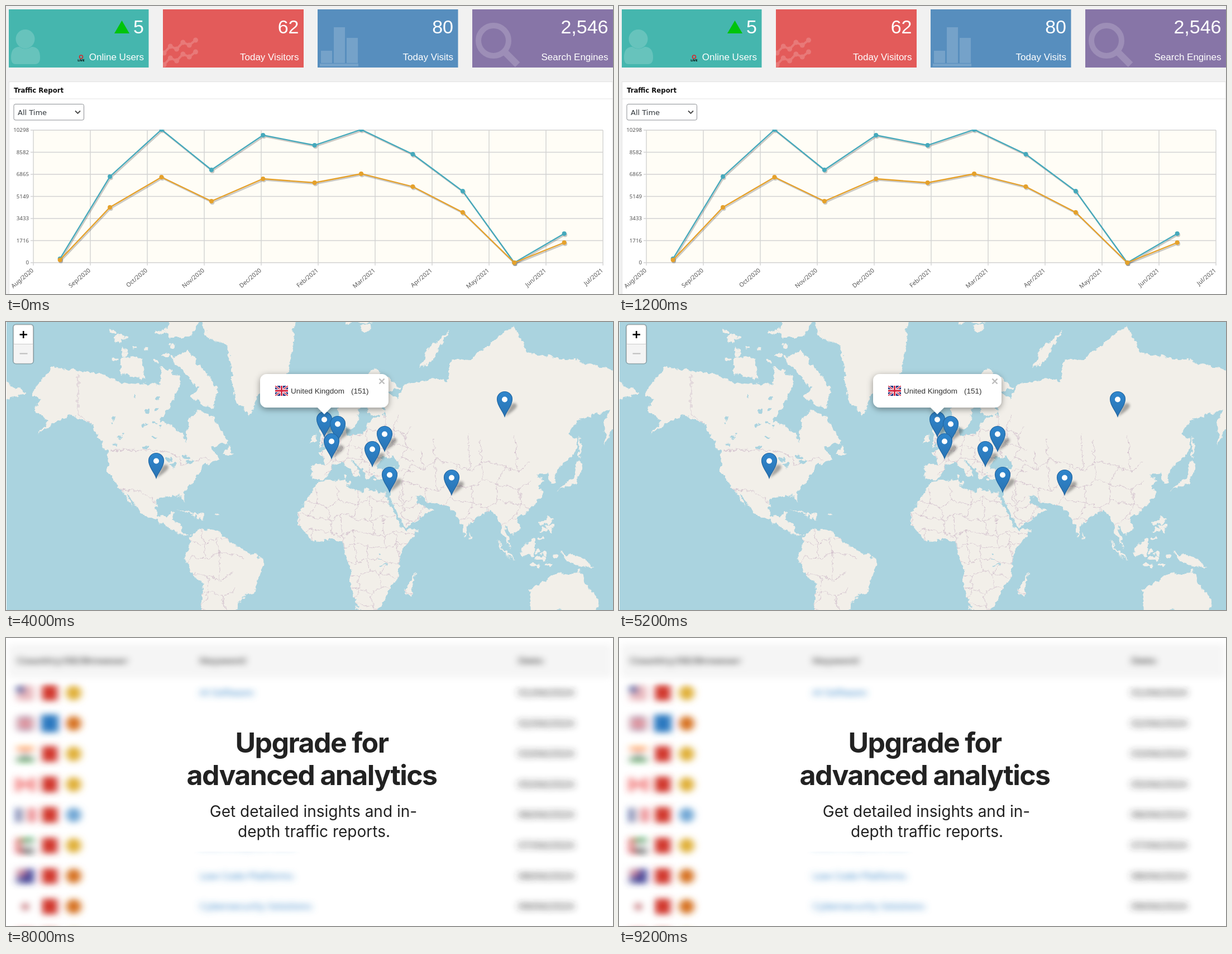
Animation, 1087 px wide and 515 px high, one loop 10 s. Source, as an HTML page:

```html
<!DOCTYPE html>
<html lang="en">
<head>
<meta charset="utf-8">
<title>Site statistics</title>
<style>
  html, body { margin: 0; width: 100%; height: 100%; overflow: hidden; background: #fff; }
  svg { display: block; width: 1087px; height: 515px; font-family: "DejaVu Sans", sans-serif; }
  .arial { font-family: "Liberation Sans", sans-serif; }
  .noto { font-family: "Noto Sans", sans-serif; }
  .inter { font-family: Inter, sans-serif; }
</style>
</head>
<body>
<svg id="stage" viewBox="0 0 1087 515"></svg>
<script>
const SCENE_MS = 2000;
const DAY_MS = 864e5;

const text = (x, y, size, str, attrs = '') => `<text x="${x}" y="${y}" font-size="${size}" ${attrs}>${str}</text>`;
const rect = (x, y, w, h, fill, attrs = '') => `<rect x="${x}" y="${y}" width="${w}" height="${h}" fill="${fill}" ${attrs}/>`;
const circle = (x, y, r, fill, attrs = '') => `<circle cx="${x}" cy="${y}" r="${r}" fill="${fill}" ${attrs}/>`;
const path = (d, attrs = '') => `<path d="${d}" ${attrs}/>`;
const stroke = (color, width) => `fill="none" stroke="${color}" stroke-width="${width}"`;
const hline = (x1, x2, y, color) => path(`M${x1} ${y}H${x2}`, stroke(color, 1));
const range = n => [...Array(n).keys()];
const END = 'text-anchor="end"', MIDDLE = 'text-anchor="middle"', BOLD = 'font-weight="bold"';

// ---- Flags, on a 24 x 16 field ----
const WHITE = '#fff', RED = '#d8142c', MAPLE = '#f01818';
const rows = (...colors) => colors.map((c, i) => rect(0, i * 16 / colors.length, 24, 16 / colors.length, c)).join('');
const cols = (...colors) => colors.map((c, i) => rect(i * 24 / colors.length, 0, 24 / colors.length, 16, c)).join('');
const unionJack = rect(0, 0, 24, 16, '#1f2f7c') +
  path('M0 0L24 16M24 0L0 16', stroke(WHITE, 3.4)) + path('M0 0L24 16M24 0L0 16', stroke('#d4213d', 1.3)) +
  path('M12 0V16M0 8H24', stroke(WHITE, 5)) + path('M12 0V16M0 8H24', stroke('#d4213d', 2.8));
const flags = {
  th: rows('#e3122b', WHITE, '#28327f', '#28327f', WHITE, '#e3122b'),
  np: path('M1 .5L22 8H9L20 15.5H1Z', 'fill="#d5173f" stroke="#233a8c"') + circle(6, 11.5, 2, WHITE) + circle(6, 5, 1.4, WHITE),
  unknown: rect(0, 0, 24, 16, '#f5f5f5') + path('M9 7.5L12 5L15 7.5V11H9Z', 'fill="#d0d0d0"'),
  proxy: rows('#b8b8b8', '#c6c6c6', '#a8a8a8') + text(12, 15, 17, '?', `${MIDDLE} ${BOLD} font-family="Liberation Serif, serif" fill="#000"`),
  us: rows(...range(13).map(i => i % 2 ? WHITE : '#cf3347')) + rect(0, 0, 11, 8.6, '#3b4a91') +
    path('M1 2H11M1 4.4H11M1 6.8H11', stroke('#c9cfe6', .7) + ' stroke-dasharray="1 1"'),
  in: rows('#ff9933', WHITE, '#138a1b') + circle(12, 8, 1.9, '#c5c8ea', 'stroke="#33419b" stroke-width=".7"'),
  id: rows(RED, WHITE),
  at: rows('#e0231c', WHITE, '#e0231c'),
  gb: unionJack,
  ca: cols(MAPLE, WHITE, WHITE, MAPLE) + path('M12 3L14 5V7.500L16.500 7L12 12L7.500 7L10 7.500V5ZM12 8V13', `fill="${MAPLE}" stroke="${MAPLE}" stroke-width=".6"`),
  fr: cols('#1e3c93', WHITE, '#e32a3c'),
  ae: rows('#00963a', WHITE, '#000') + rect(0, 0, 6, 16, '#e3142b'),
  au: rect(0, 0, 24, 16, '#17178c') + `<g transform="scale(.48)">${unionJack}</g>` + circle(6, 12, 1.5, WHITE) +
    range(4).map(i => circle(18 + 3 * Math.sin(i * Math.PI / 2), 8 - 5 * Math.cos(i * Math.PI / 2), .9, WHITE)).join(''),
  jp: rect(0, 0, 24, 16, WHITE) + circle(12, 8, 4.8, '#c00d2d'),
  eg: rows(RED, WHITE, '#000') + circle(12, 8, 1.9, '#d9ab36')
};
const flag = (id, x, y, w, h) => `<use href="#flag-${id}" x="${x}" y="${y}" width="${w}" height="${h}"/>`;
const defs = '<defs>' + Object.entries(flags).map(([id, art]) =>
  `<symbol id="flag-${id}" viewBox="0 0 24 16" preserveAspectRatio="none">${art}</symbol>`).join('') + `
  <filter id="coast" filterUnits="userSpaceOnUse" x="-20" y="-20" width="1130" height="560" color-interpolation-filters="sRGB">
    <feTurbulence type="fractalNoise" baseFrequency=".1" numOctaves="4" seed="4"/>
    <feDisplacementMap in="SourceGraphic" scale="12" xChannelSelector="R" yChannelSelector="G"/>
  </filter>
  <filter id="frost" filterUnits="userSpaceOnUse" x="-60" y="-60" width="1220" height="660"><feGaussianBlur stdDeviation="7 6"/></filter>
  <filter id="soft" x="-50%" y="-50%" width="200%" height="200%"><feGaussianBlur stdDeviation="2"/></filter>
  <filter id="popupShadow" x="-10%" y="-30%" width="120%" height="170%"><feDropShadow dx="0" dy="3" stdDeviation="6" flood-opacity=".4"/></filter>
  <linearGradient id="pinFill" x2="0" y2="1"><stop stop-color="#2f86cd"/><stop offset="1" stop-color="#2a74b4"/></linearGradient>
  <clipPath id="plot"><rect x="44" y="221" width="1030" height="244"/></clipPath></defs>`;

// ---- Dashboard ----
function dashboard() {
  const card = (x, w, color, value, label, icon) => rect(x, 6, w, 104, color) +
    `<g opacity=".18">${icon}</g><g class="arial" fill="#fff">` +
    text(x + w - 8.5, 49, 34, value, END) + text(x + w - 8.5, 97, 17, label, END) + '</g>';
  const trend = y => {
    const pts = [23, 11, 16, 4, 9, 0].map((dy, i) => [283 + i * 11.3, y + dy]);
    return path('M' + pts.join('L'), stroke(WHITE, 4)) + pts.map(([px, py]) => circle(px, py, 4.5, WHITE)).join('');
  };
  const cards =
    card(5, 250.5, '#45b6ae', '5', 'Online Users', circle(34.5, 59, 17, WHITE) +
      path('M9 92Q9 73 24 73Q34 80 46 73Q61 73 61 92Q61 104 52 104H17Q9 104 9 92Z', 'fill="#fff"')) +
    card(281, 252, '#e35b5a', '62', 'Today Visitors', trend(61) + trend(82)) +
    card(558, 251.5, '#578ebe', '80', 'Today Visits',
      [80, 38, 57].map((y, i) => rect(564 + i * 23, y, 20, 102 - y, WHITE)).join('') + rect(562, 103, 69, 5, WHITE)) +
    card(835, 252, '#8775a7', '2,546', 'Search Engines', circle(873, 62, 27, 'none', 'stroke="#fff" stroke-width="10"') +
      path('M893 82L916 105', stroke(WHITE, 12)));
  const live = circle(134.5, 91, 3, 'none', 'stroke="#d4282c" stroke-width="1.6"') + text(134.5, 99, 5, 'LIVE', `${MIDDLE} ${BOLD} fill="#000"`);

  // The axis runs from mid August with one tick every 34.24 days.
  const axisStart = Date.UTC(2020, 7, 16), pxPerDay = 2.98;
  const dayX = ms => 49 + (ms - axisStart) / DAY_MS * pxPerDay;
  let grid = rect(49, 222, 1020, 237, '#fffdf6'), labels = '';
  for (let i = 0; i <= 10; i++) {
    const date = new Date(axisStart + i * 34.24 * DAY_MS), x = 49 + i * 102;
    const month = date.toLocaleString('en-US', { month: 'short', timeZone: 'UTC' });
    grid += path(`M${x} 222V464`, stroke('#d2d2d2', 1.4));
    labels += text(0, 0, 10.7, `${month}/${date.getUTCFullYear()}`, `${END} transform="translate(${x + 1} 474) rotate(-40)"`);
  }
  for (let i = 0; i <= 6; i++) {
    const y = 459 - i * 39.5;
    grid += path(`M44 ${y}H1069`, stroke('#d2d2d2', 1.4));
    labels += text(41, y + 3, 9.7, Math.round(10298 * i / 6), END);
  }
  const series = (color, heights) => {
    const pts = heights.map((h, i) => [dayX(Date.UTC(2020, 8 + i, 1)), 459 - h]);
    const line = 'M' + pts.join('L');
    const dots = fill => pts.map(([x, y]) => circle(x, y, 4, fill)).join('');
    return `<g transform="translate(1.5 2.2)" opacity=".2">${path(line, stroke('#000', 2.6))}${dots('#000')}</g>` +
      path(line, stroke(color, 2.3)) + dots(color);
  };
  return rect(0, 0, 1087, 515, '#f1f1f1') + cards + path('M194 49L207.5 26L221 49Z', 'fill="#00c40b"') + live +
    rect(5.5, 135.5, 1081, 390, WHITE, 'stroke="#e3e3e3"') + hline(5, 1087, 166, '#e3e3e3') +
    text(14, 155, 11.7, 'Traffic Report', `${BOLD} fill="#111"`) +
    rect(14, 175.5, 125.5, 28.5, WHITE, 'rx="3" stroke="#8c8f94"') + text(21, 195, 13, 'All Time', 'fill="#32373c"') +
    path('M124 187.5L128.5 192L133 187.5', stroke('#444', 1.8)) +
    grid + `<g class="noto" fill="#555">${labels}</g><g clip-path="url(#plot)">` +
    series('#45a9bc', [7, 154, 238, 166, 228, 210, 238, 194, 128, 0, 52]) +
    series('#e5a12b', [5, 99, 153, 110, 150, 143, 159, 136, 90, 0, 36]) + '</g>';
}

// ---- Recent visitors ----
function visitors() {
  const visits = [
    ['124.121.239.231', 'th', 'Thailand, Bangkok, Bangkok', '10:03', 1],
    ['111.119.49.191', 'np', 'Nepal, Kathmandu, Bagmati Province', '09:55', 1],
    ['138.199.62.8', 'unknown', 'Europe, Central, Central and Western District', '09:47', 5],
    ['45.146.13.160', 'proxy', 'Anonymous Proxy, Al Mawāşī, Gaza Strip', '09:43', 1, 'unlinked'],
    ['184.82.14.130', 'us', 'United States, Bangkok, Bangkok', '09:36', 1],
    ['223.178.211.7', 'in', 'India, Chandigarh, Chandigarh', '09:36', 0],
    ['182.1.65.207', 'id', 'Indonesia, Kebomas, East Java', '09:34', 1],
    ['184.82.199.79', 'us', 'United States, Bang Kruai, Nonthaburi', '09:28', 2],
    ['77.119.174.38', 'at', 'Austria, Vienna, Vienna', '09:21', 1],
    ['192.143.78.140', 'proxy', 'Anonymous Proxy, Bloemfontein, Orange Free State', '09:17', 0]
  ];
  const size = 10.35;
  const ipWidth = ip => [...ip].reduce((w, c) => w + (c === '.' ? .318 : .636) * size, 0);
  const openIcon = (x, y) => `<g transform="translate(${x} ${y})" ${stroke('#a5a5a5', 1.1)}>` +
    rect(.5, 5.5, 9, 9, WHITE) + rect(4.5, .5, 10.5, 10.5, WHITE) + path('M7.5 8L12 3.5M8.5 3.5H12V7', 'stroke="#666"') + '</g>';
  const heading = (x, label) => text(x, 30, 11.2, label, `${BOLD} fill="#23282d"`);
  let top = 45.5;
  const body = visits.map(([ip, country, place, time, hits, unlinked]) => {
    const height = hits ? 44.5 : 36.5, y = top + height / 2 - .5;
    top += height;
    return hline(9, 1079, Math.floor(top) + .5, '#ebebeb') + text(14, y + 4, size, ip) +
      (unlinked ? '' : openIcon(14 + ipWidth(ip) + 3.5, y - 7)) +
      flag(country, 181, y - 8.5, 20.5, 17) + text(205, y + 3, size, place) +
      text(827, y + 4, 10.55, `20 Jul 2022 @ ${time} am`) +
      (hits ? rect(1021.5, y - 12, 24.5, 25, '#4caf50') + text(1034, y + 6.5, 16, hits, `${MIDDLE} fill="#fff"`) : text(1022, y + 4, size, '/'));
  }).join('');
  const page = (x, label, fill = '#222') => text(x, 496.5, 11, label, `${MIDDLE} fill="${fill}"`);
  return rect(9, 5.5, 1070.5, 40, '#f5f5f5', 'rx="5"') +
    heading(19, 'IP Address') + heading(185, 'Location') + heading(832, 'Time') + heading(1027, 'Hits') +
    body + rect(405, 473, 298, 3, WHITE) + rect(448, 481, 28, 22, '#0073aa') +
    range(5).map(i => page(462 + i * 33.6, i + 1, [WHITE, , , '#15157a'][i])).join('') + page(619.5, '...') + page(649, '10231') +
    path('M432 488L426.5 493.5L432 499M685.5 488L691 493.5L685.5 499', stroke('#111', 2));
}

// ---- World map: key points as "longitude,latitude" in Mercator projection; noise roughens the coasts ----
const project = ([lng, lat]) => [576 + lng * 3.17, 408 - 181.6 * Math.asinh(Math.tan(lat * Math.PI / 180))].map(v => v.toFixed(1));
const outline = points => 'M' + points.split(' ').map(p => project(p.split(',').map(Number))).join('L');

const continents = {
  northAmerica: '-164,54.7 -158,58.7 -166,62 -161,64.5 -168,65.6 -156,71.3 -128,70 -115,68 -95,68 -94,71.5 -82,69 -87,64.5 -94.5,59 -82,55 -80,51.2 -78.5,59 -73,62 -65,60 -56,52 -66,50 -61,46 -70,43 -76,36 -81,31.5 -81,25.2 -84,30 -97,28 -96,18.8 -91,18.7 -87,21.3 -88,16 -83.3,15 -83,10 -78,8.5 -83,8.3 -95,16 -105.5,20.3 -114,31.5 -110,23 -117,32.5 -124,40.4 -124,48 -134,58 -145,60.3 -152,59',
  southAmerica: '-78,8 -72,12 -62,10.6 -50,1 -35.3,-5.5 -39,-14 -41,-22 -48.5,-26 -54,-35 -72,-35 -70.3,-18 -76,-14 -81.2,-5 -77.5,4',
  greenland: '-73,79 -68,76 -57,75 -52,64.5 -44,59.9 -40,65 -22,70.5 -17,80',
  africa: '-6,35.8 10,37.3 11,34 20,30.8 22,32.8 32.5,30.5 37.2,20 43.2,11.5 51.2,11.8 40,-3 40.7,-15 35,-20 32,-28 27,-33.7 18.5,-34.3 12,-17 13.7,-11 9,0 9,4.3 2,6.3 -7.5,4.4 -17,14.7 -16.5,21 -9.7,30',
  europe: '60,69 44,68 39,64.6 33,66.5 41,67 27,71 14.5,68 5.5,62.2 5.2,59.5 12.5,56 16,56.5 17.5,61.5 25,65 22,61 29,60 24,59 21,55 11,54.3 10,57.5 8,53.8 -4.6,48.3 -1.5,43.4 -9,43 -9,37 -2,36.8 3,42.5 8.5,44.3 16,38 18.4,40 13,45.6 19.4,41.7 22.8,36.6 26.5,40.5 27,37 36,36.7 60,30',
  asia: '36,36.7 34.9,29 43.5,12.7 59.8,22.5 51.5,25 50,30 57,26 66.5,25.2 72.8,20 77.5,8 80,15 91.5,22.5 97.3,17 98.5,9 103.5,1.4 100,13.3 105,9 109,12 106,18 114,22.3 122,30 119.5,35 122,37 118,39 124.5,39.8 126,35 129,35.5 128,40 140,48 141,53 135.5,54.7 142,59 160,62 156,58 157,51 163.5,59.5 180,62 180,69 140,72.5 113,73.7 105,77.5 80,72.5 70,72.8 68,68.5 58,69 44,55',
  australia: '114,-22 131,-12 136,-15 142,-11 146,-19 153.3,-27 152,-35 138,-35 131,-31.5 115,-34.5'
};
const islands = {
  britain: '-5,50 1.5,52 -2,57.5 -5,58.6 -3,54', ireland: '-10,52 -6.3,52.2 -7,55', madagascar: '49.3,-12 47,-25 43.5,-23',
  japan: '130,32 140,35 145,43.5 141,45 139,38', sakhalin: '142,46 144,50 142,54', borneo: '109,1 117,7 117,-3 110,-3',
  sumatra: '95.3,5.6 106,-5.8 101,-3', newGuinea: '131,-1 145,-4.5 150,-10 138,-8', novayaZemlya: '52,71 56,74 69,76.9 58,72',
  baffin: '-65,62 -78,65 -73,67 -89,73 -79,74 -62,67', victoria: '-117,70 -103,69 -106,73 -117,73', ellesmere: '-90,76 -78,76 -65,80 -90,80',
  newfoundland: '-59,47.7 -53,47 -56,51', cuba: '-85,22 -75,20 -78,21.5', sriLanka: '80,9.7 81.8,7 80,6', chukotka: '-185,69 -170,66 -185,64'
};
const blackSea = '28,42 31,46.5 38,46.5 41.5,42 35,42 31,41.2';

function randomFrom(seed) {
  return () => (seed = seed * 16807 % 2147483647) / 2147483647;
}

// Small blobs spread over a box: islands or lakes.
function scatter(west, south, east, north, count, size) {
  const random = randomFrom(Math.round(4000 + west * 7 + north));
  return range(count).map(() => {
    const [x, y] = project([west + random() * (east - west), south + random() * (north - south)]);
    return `<ellipse cx="${x}" cy="${y}" rx="${size * (.5 + random())}" ry="${size * (.4 + random() * .6)}"/>`;
  }).join('');
}

// Country borders: a jittered lattice with some edges left out.
function mesh(west, south, east, north, step) {
  const node = (i, j) => {
    const random = randomFrom(977 + i * 7919 + j * 104729);
    random();
    const jitter = () => (random() - .5) * step * .7;
    return project([west + i * step + jitter(), south + j * step + jitter()]);
  };
  let d = '';
  for (let i = 0; west + i * step < east; i++)
    for (let j = 0; south + j * step < north; j++) {
      d += `M${node(i, j)}L${node(i + 1, j)}`;
      if ((i + j) % 3) d += `M${node(i, j)}L${node(i, j + 1)}`;
    }
  return d;
}

function worldMap() {
  const coast = path([...Object.values(continents), ...Object.values(islands)].map(p => outline(p) + 'Z').join(''));
  const archipelagos = scatter(-122, 72, -86, 77, 16, 6) + scatter(-76, 17.5, -62, 20, 6, 4) + scatter(120, 7, 126, 18, 9, 5) +
    scatter(116, -9, 130, 1, 10, 4.5) + scatter(9, 35, 27, 40, 6, 3.5) + scatter(12, 77, 22, 79, 4, 9);
  const lakes = scatter(-122, 50, -95, 66, 14, 3.5) + scatter(-90, 42.5, -78, 47.5, 7, 5) + scatter(29, -12, 34, 0, 5, 2.5) + scatter(28, 60, 36, 62, 3, 3.5);
  const borders = outline('-141,69.6 -141,60.3 -134,58') + outline('-123,49 -95,49 -84,46.5 -82.5,43 -75,45 -67,46') + outline('-117,32.5 -106,31.7 -97,26') +
    mesh(-16, -30, 45, 32, 8) + mesh(-2, 40, 44, 58, 5) + mesh(44, 16, 112, 50, 9) + mesh(-80, -34, -50, 8, 10);
  const pin = ([x, y]) => `<g transform="translate(${x} ${y})">` +
    path('M0 0L10 -20Q18 -28 22 -20Q22 -13 0 0Z', 'opacity=".4" filter="url(#soft)"') +
    path('M0 0C-3 -10 -13.5 -19 -13.5 -31A13.5 13.5 0 0 1 13.5 -31C13.5 -19 3 -10 0 0Z', 'fill="url(#pinFill)" stroke="#2368a3" stroke-width="1.2"') +
    circle(0, -30.5, 5, WHITE) + '</g>';
  const pins = [[893, 169], [570, 205], [594, 213], [678, 231], [583, 244], [656, 258], [269, 279], [687, 304], [798, 309]];
  const zoom = rect(13, 4.5, 36, 70, WHITE, 'rx="5" stroke="#000" stroke-opacity=".25" stroke-width="2.2"') +
    rect(14, 40, 34, 33.5, '#f4f4f4', 'rx="3"') + hline(14, 48, 39.5, '#ccc') +
    path('M24.5 22.5H38M31.2 16V29', stroke('#000', 2.6)) + path('M24.5 56.5H38.5', stroke('#bbb', 2));
  const popup = '<g filter="url(#popupShadow)">' + rect(455, 93, 230, 60, WHITE, 'rx="12"') + path('M557 152H583L570 165Z', 'fill="#fff"') + '</g>' +
    flag('gb', 482, 114, 23, 18) + `<g class="arial">${text(510, 127.5, 13.5, 'United Kingdom')}${text(618, 127.5, 13.5, '(151)')}</g>` +
    path('M668.5 101.5l9 9m0 -9l-9 9', stroke('#bdbdbd', 2.4));
  return `<clipPath id="land">${coast}</clipPath>` + rect(1, 0, 1086, 515, '#aad3df') +
    `<g filter="url(#coast)"><g fill="#f2efe9">${coast}${archipelagos}</g>` +
    `<g clip-path="url(#land)">${path(borders, stroke('#cdb9c8', .8))}</g>` +
    `<g fill="#aad3df">${path(outline(blackSea) + 'Z')}${lakes}</g></g>` +
    rect(0, 0, 1, 515, WHITE) + zoom + pins.map(pin).join('') + popup;
}

// ---- Search words ----
const square = (color, w) => y => rect(74 - w / 2, y - w / 2, w, w, color, 'rx="2"');
const disc = color => y => circle(109.5, y, 11, color);
const engineA = square('#d0342c', 23), engineB = square('#2a78bf', 26);
const browserA = disc('#dfae35'), browserB = disc('#d5701f'), browserC = disc('#6fa6d4');
const brokenImage = y => `<g transform="translate(98.5 ${y - 11})">` + rect(0, 0, 22, 22, WHITE, 'stroke="#aaa"') + rect(2.5, 3, 17, 16, '#c4d9f2') +
  path('M2.5 19V15L8.5 10L14.5 14L19.5 9Z', 'fill="#4ba03f"') + path('M9.5 22L22 11V22Z', 'fill="#fff" stroke="#bbb"') + '</g>';

function searchTable(right, dateX, lastBrowser, ruled) {
  const searches = [
    ['us', engineA, browserA, 'AI Software', '01'], ['gb', engineB, browserB, 'SaaS Tools', '02'],
    ['in', engineA, browserA, 'Marketing Automation', '03'], ['ca', engineA, browserA, 'Cloud Solutions', '05'],
    ['fr', engineA, browserC, 'Best CRM Platforms', '06'], ['ae', engineA, browserA, 'Data Analytics Tools', '07'],
    ['au', engineA, browserB, 'Low Code Platforms', '08'], ['jp', engineA, lastBrowser, 'Cybersecurity Solutions', '09'],
    ['eg', engineA, browserA, 'Automation Software', '10']
  ];
  const heading = (x, size, label) => text(x, 83, size, label, `${BOLD} fill="#2b2b2b"`);
  return rect(13, 53, right - 13, 50, '#f5f5f5', 'rx="4"') +
    heading(25, 14.7, 'Country/SE/Browser') + heading(296.5, 14, 'Keyword') + heading(dateX, 14, 'Date') +
    searches.map(([country, engine, browser, words, day], i) => {
      const y = 125.3 + i * 45.2;
      return flag(country, 25, y - 10.5, 25.5, 21.5) + engine(y) + browser(y) +
        text(296.5, y + 5, 14, words, 'fill="#428bca"') + text(dateX, y + 5, 14.4, `${day}/04/2024`) +
        (ruled ? hline(13, right, Math.round(y + 22) + .5, '#ececec') : '');
    }).join('');
}

function searchWords() {
  return text(19, 19.5, 16.2, 'Latest Search Words', `${BOLD} fill="#000"`) +
    path('M1026 11H1019.5V23.5H1032V18M1027.5 9H1034V15.5M1033.5 9.5L1024.5 18.5', stroke('#000', 2.2)) +
    circle(1053.5, 14, 5.2, 'none', 'stroke="#000" stroke-width="2.4"') + path('M1057.5 18L1063.5 24', stroke('#000', 3.2)) +
    searchTable(1077, 937.5, brokenImage, true);
}

function upgrade() {
  const title = `${MIDDLE} ${BOLD} letter-spacing="-1.6"`;
  return `<g filter="url(#frost)"><g transform="translate(-11 -53) scale(1.207)">${searchTable(908, 769, browserB, false)}</g></g>` +
    rect(250, 125, 600, 257, WHITE) + '<g class="inter" fill="#222">' +
    text(547.5, 205, 50, 'Upgrade for', title) + text(547.5, 263, 50, 'advanced analytics', title) +
    text(550.5, 319.5, 28, 'Get detailed insights and in-', MIDDLE) + text(551.5, 356, 28, 'depth traffic reports.', MIDDLE) + '</g>';
}

const stage = document.getElementById('stage');
stage.innerHTML = defs + [dashboard, visitors, worldMap, searchWords, upgrade]
  .map(scene => `<g class="scene" fill="#333" visibility="hidden">${scene()}</g>`).join('');
const scenes = [...stage.querySelectorAll('.scene')];
const start = performance.now();

function show() {
  const current = Math.floor((performance.now() - start) / SCENE_MS) % scenes.length;
  scenes.forEach((scene, i) => scene.setAttribute('visibility', i === current ? 'visible' : 'hidden'));
  requestAnimationFrame(show);
}
show();
</script>
</body>
</html>
```
